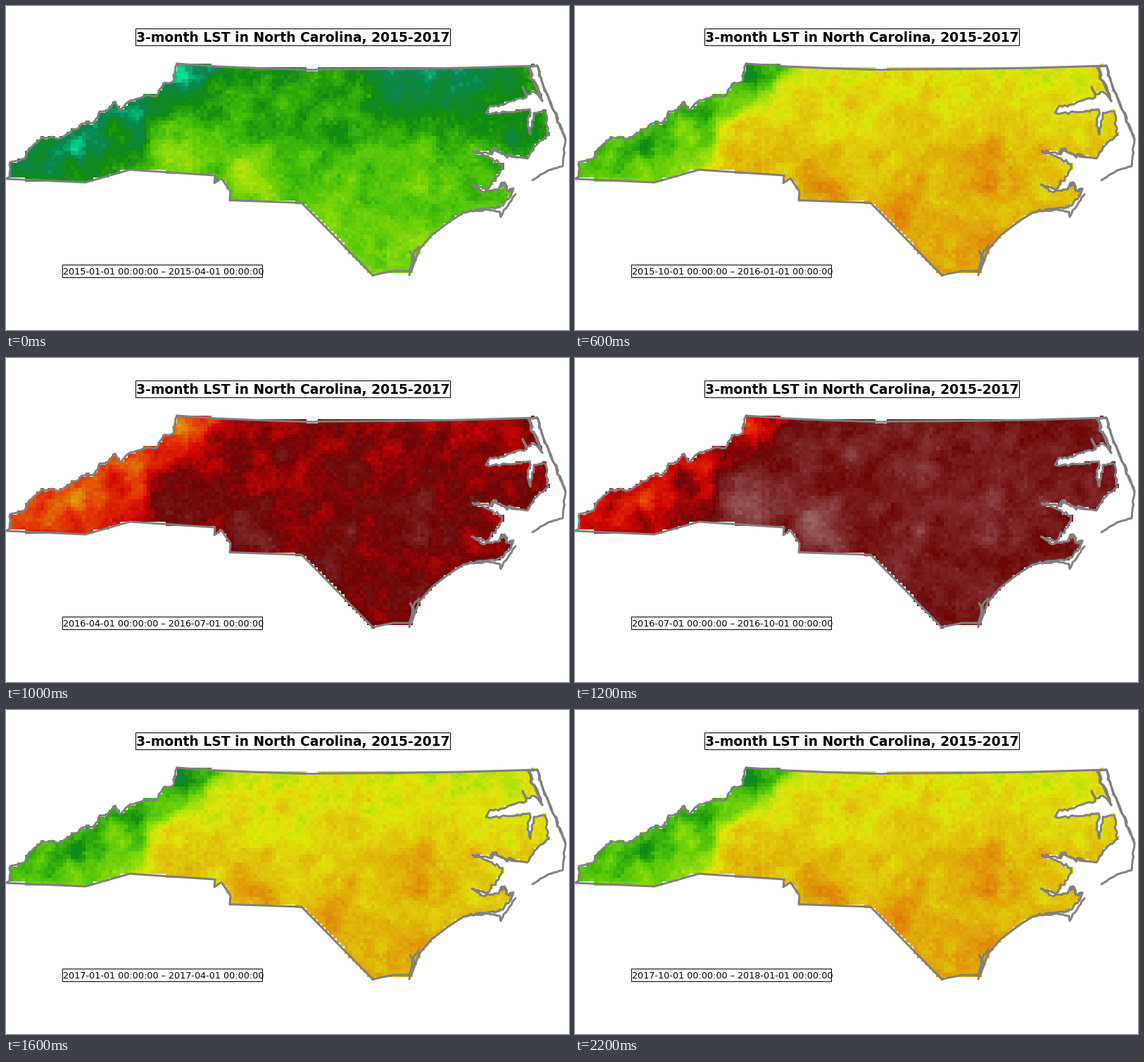
Write a matplotlib script that moves like this. It is 800x461 px and loops after 2.4 s.

```python
import numpy as np
import matplotlib.pyplot as plt
from matplotlib.animation import FuncAnimation
from matplotlib.patches import Rectangle
from matplotlib.path import Path

W, H, DPI = 800, 461, 64
CELL, NX, NY, TOP = 5.4, 148, 56, 82.6
GREY = "#808080"

# Key points of the outline, clockwise from the north-west corner
NORTH = [(243, 82), (300, 86), (360, 88.5), (436, 91), (450, 90.2),
         (560, 89.5), (650, 88), (755, 85)]
SOUNDS = [(742, 87), (750, 107), (762, 135), (750, 122), (740, 126), (734, 115),
          (739, 130), (715, 136), (700, 143), (688, 142), (682, 152), (712, 151),
          (744, 147), (741, 170), (745, 183), (750, 152), (766, 150), (771, 183),
          (757, 194), (741, 217)]
RIVERS = [(728, 215), (708, 211), (692, 203), (690, 211), (663, 206), (685, 215),
          (705, 225), (700, 241), (682, 261), (662, 254), (680, 265), (700, 261),
          (708, 251), (711, 262), (721, 260), (706, 284), (650, 294)]
SOUTH = [(630, 307), (605, 326), (587, 347), (576, 377), (550, 377), (521, 383),
         (420, 280), (318, 276.5), (319, 264), (306, 245), (296, 252), (297, 241),
         (176, 233), (113, 251), (0, 246)]
WEST = [(5, 243), (6, 222), (27, 217), (33, 203), (52, 187), (78, 188), (111, 167),
        (126, 165), (133, 150), (143, 150), (155, 136), (161, 148), (177, 134),
        (200, 127), (214, 128), (226, 109), (237, 108), (243, 82)]
BANKS = [(755, 85), (764, 115), (779, 150), (795, 190), (791, 228), (770, 234),
         (748, 248)]
CAPES = [[(650, 294), (680, 290), (702, 293), (703, 300), (724, 268)],
         [(574, 349), (577, 365), (573, 383)],
         [(587, 342), (580, 350), (578, 368)]]

# Centres and radii of warm or cold areas
RIDGES = [(250, 95, 18), (187, 166, 14), (103, 188, 18), (68, 230, 16),
          (130, 212, 14)]
VALLEYS = [(158, 186, 16), (182, 212, 15)]
FOOTHILLS = [(245, 208, 38), (345, 235, 30)]
PLAINS = [(466, 290, 25), (580, 225, 50), (350, 258, 22)]
TOWNS = [(487, 245, 12), (500, 160, 18), (390, 138, 16), (690, 183, 13)]
POOLS = [(640, 112, 75), (560, 105, 50), (472, 180, 24), (735, 190, 35)]
BOGS = [(243, 187, 10), (720, 185, 15), (508, 146, 9), (530, 340, 9)]

# One colour per unit of heat
RAMP = np.array([
    (0, 225, 145), (10, 134, 84), (18, 140, 14), (72, 194, 10), (142, 220, 10),
    (224, 230, 10), (224, 182, 10), (224, 130, 10), (228, 58, 6), (208, 5, 5),
    (108, 6, 6), (130, 45, 48), (152, 98, 100)]) / 255

rng = np.random.default_rng(15)
gx, gy = np.meshgrid((np.arange(NX) + .5) * CELL,
                     TOP + (np.arange(NY) + .5) * CELL)


def pt(px):
    return px * 72 / DPI


def rough(points, amp):
    """Split a line into short steps and jitter all but its key points."""
    out = []
    for a, b in zip(points, points[1:]):
        n = int(np.hypot(b[0] - a[0], b[1] - a[1]) // 5) + 1
        t = np.arange(n)[:, None] / n
        out.append(np.array(a) * (1 - t) + np.array(b) * t
                   + rng.normal(0, amp, (n, 2)) * (t > 0))
    return np.vstack(out + [points[-1:]])


def blobs(spots):
    return sum(np.exp(-((gx - x) ** 2 + (gy - y) ** 2) / r ** 2)
               for x, y, r in spots)


def noise(passes):
    n = rng.normal(size=(NY, NX))
    for _ in range(passes):
        for axis in (0, 1):
            n = (np.roll(n, 1, axis) + n + np.roll(n, -1, axis)) / 3
    return n / n.std()


state = np.vstack([NORTH, rough(SOUNDS, 1), rough(RIVERS, 1.3), SOUTH,
                   rough(WEST, .8)])
islands = [rough(BANKS, .6), rough(BANKS[:4], 1), rough(SOUNDS[:3], 2),
           rough(RIVERS[:4], 2), rough(RIVERS[11:15], 2)]
islands += [rough(c, 1) for c in CAPES]

edge = np.interp(gy, [82, 130, 165, 235], [318, 265, 215, 188])
mount = 1 / (1 + np.exp((gx - edge) / 9))
lowland = 1 - mount
south = (gy - 88) / 292
relief = mount * (.9 * blobs(VALLEYS) - .7 * blobs(RIDGES) + .3 * noise(2))
texture = .2 * noise(3) + .13 * noise(0)
inside = Path(state).contains_points(np.c_[gx.ravel(), gy.ravel()])
inside = inside.reshape(gx.shape).astype(float)


def shade(q):
    year, season = divmod(q, 4)
    base = (2.2 + 1.3 * year, 9.6, 10.5, 5)[season]
    w = (base - 2.2) / 8.3  # 0 coldest quarter, 1 hottest
    bend = np.sin(np.pi * w)
    heat = (base + relief + texture
            + 1.6 * (1 - w ** 3) * south
            - (1.3 + 1.2 * bend) * mount
            + (.3 + .9 * (2 * w - 1) ** 6) * blobs(FOOTHILLS) * lowland
            + (.4 + .5 * bend) * blobs(PLAINS)
            + (.4 + .4 * w) * blobs(TOWNS)
            - max(0, 1 - 8 * w) * blobs(POOLS)
            - (.9 - .4 * w) * blobs(BOGS))
    rgb = [np.interp(heat, range(len(RAMP)), channel) for channel in RAMP.T]
    return np.dstack(rgb + [inside])


def period(q):
    start, end = (f"{2015 + i // 4}-{1 + i % 4 * 3:02d}-01 00:00:00"
                  for i in (q, q + 1))
    return f"{start} – {end}"


maps = [shade(q) for q in range(12)]

fig = plt.figure(figsize=(W / DPI, H / DPI), dpi=DPI, facecolor="white")
ax = fig.add_axes([0, 0, 1, 1])
image = ax.imshow(maps[0], extent=(0, NX * CELL, TOP + NY * CELL, TOP),
                  interpolation="nearest", aspect="auto")
ax.set(xlim=(0, W), ylim=(H, 0))
ax.axis("off")

for line in [state] + islands:
    ax.plot(*line.T, color=GREY, lw=pt(3), solid_joinstyle="round",
            solid_capstyle="round")


def label(text, x, y, w, h, base, size, weight="normal"):
    ax.add_patch(Rectangle((x, y), w, h, fc="white", ec="black", lw=pt(1),
                           zorder=4))
    return ax.text(x + 1, base, text, family="DejaVu Sans", size=pt(size),
                   weight=weight, va="baseline", zorder=5)


label("3-month LST in North Carolina, 2015-2017", 184, 32, 447, 24, 51,
      18.7, "bold")
dates = label(period(0), 80, 368, 284, 18, 382, 12.77)


def update(q):
    image.set_data(maps[q])
    dates.set_text(period(q))
    return image, dates


anim = FuncAnimation(fig, update, frames=len(maps), interval=200,
                     repeat=True, repeat_delay=0)
plt.show()
```
